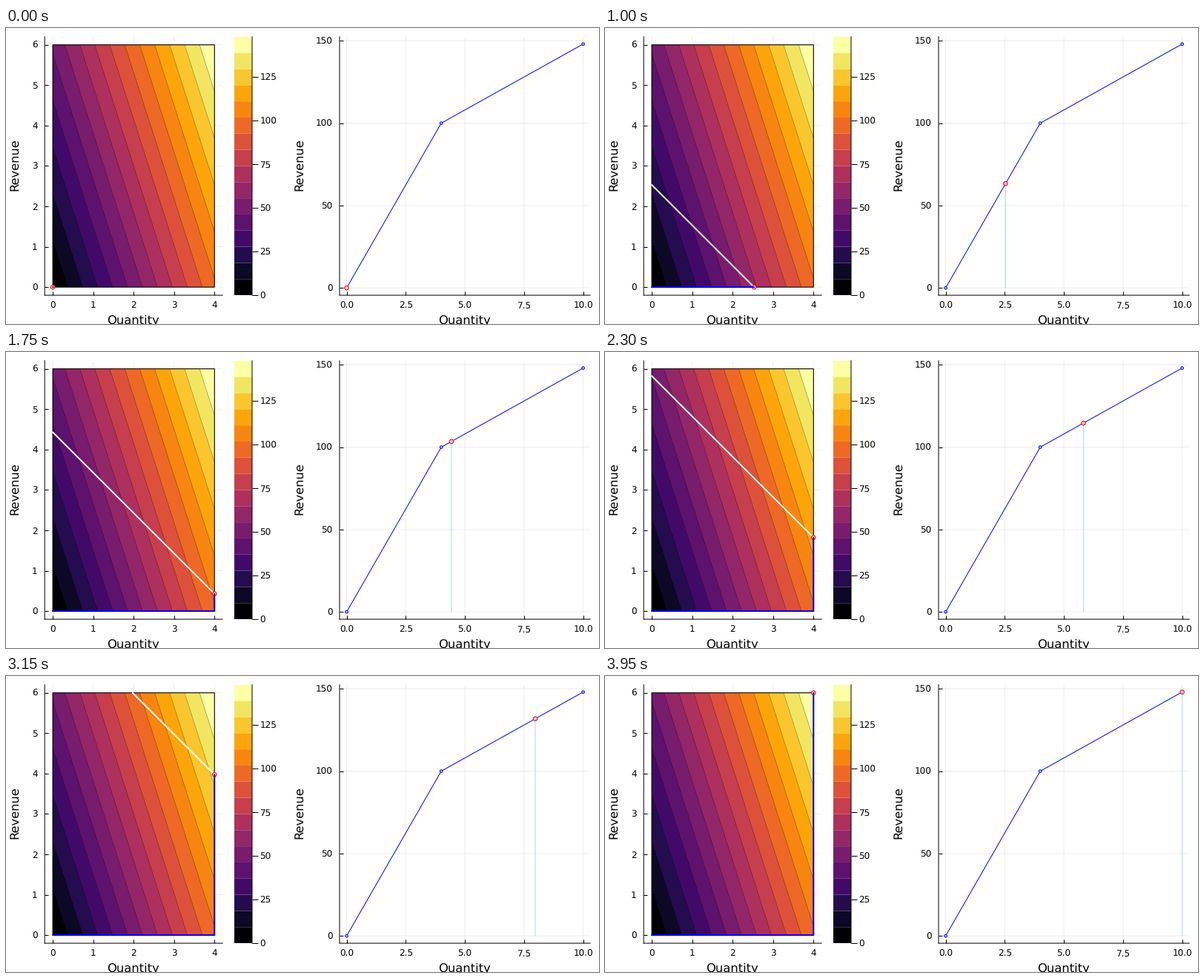
Animation of 800 by 400 pixels, one loop 4 s. Source, as a matplotlib script:

```python
import numpy as np
import matplotlib as mpl
import matplotlib.pyplot as plt
from matplotlib.animation import FuncAnimation
from matplotlib.patches import Ellipse, Rectangle

W, H, DPI = 800, 400, 100
FRAMES, INTERVAL = 80, 50
TOP, BOTTOM = 11.8, 361.1
X_MAX, Y_MAX = 4, 6
PRICE_X, PRICE_Y = 25, 8
Z_MAX = PRICE_X * X_MAX + PRICE_Y * Y_MAX
BANDS = 16


def px(n):
    return n * 72 / DPI


mpl.rcParams.update({
    "font.family": "DejaVu Sans",
    "font.size": px(12),
    "axes.linewidth": px(1),
    "text.hinting": "none",
})
fig = plt.figure(figsize=(W / DPI, H / DPI), dpi=DPI, facecolor="white")


def panel(left, right, xlim, ylim, spines):
    box = [left / W, 1 - BOTTOM / H, (right - left) / W, (BOTTOM - TOP) / H]
    ax = fig.add_axes(box, xlim=xlim, ylim=ylim, facecolor="none")
    for side, spine in ax.spines.items():
        spine.set_visible(side in spines)
        spine.set_snap(False)
    return ax


def style_plot(ax, xticks, yticks, x_mid, y_base):
    ax.set_xticks(xticks)
    ax.set_yticks(yticks)
    ax.tick_params(direction="in", length=px(5), width=px(1))
    ax.tick_params(axis="x", pad=px(8.2))
    ax.tick_params(axis="y", pad=px(9.4))
    ax.grid(color="black", alpha=0.07, lw=px(1), snap=False)
    ax.set_axisbelow(True)
    fig.text(x_mid / W, 0, "Quantity", size=px(16.4), ha="center",
             va="baseline")
    fig.text(y_base / W, 1 - 184.7 / H, "Revenue", size=px(16.3), rotation=90,
             rotation_mode="anchor", ha="center", va="baseline")


def line(ax, x, y, color, width, z):
    return ax.plot(x, y, color=color, lw=px(width), zorder=z, snap=False,
                   solid_capstyle="round", clip_on=False)[0]


def dot(ax, x, y, radius, edge, fill, z):
    # Patches keep subpixel positions, which line markers round off
    unit = np.diff(ax.transData.transform([(0, 0), (1, 1)]), axis=0)[0]
    return ax.add_patch(Ellipse((x, y), *(2 * radius / unit), ec=edge, fc=fill,
                                lw=px(1), zorder=z, clip_on=False))


# Feasible region with revenue contours
left = panel(52.2, 292.2, (-0.2, 4.2), (-0.2, 6.2), ("left", "bottom"))
style_plot(left, range(5), range(7), 171.5, 16.6)
levels = np.linspace(0, Z_MAX, BANDS + 1)
colors = mpl.colormaps["inferno"](np.linspace(0, 1, BANDS))
region = left.add_patch(Rectangle((0, 0), X_MAX, Y_MAX, fc=colors[0], lw=0))
gx, gy = np.meshgrid([-1, X_MAX + 1], [-1, Y_MAX + 1])
revenue = PRICE_X * gx + PRICE_Y * gy
for low, color in zip(levels[1:], colors[1:]):
    band = left.contourf(gx, gy, revenue, [low, 2 * Z_MAX], colors=[color],
                         antialiased=True, zorder=2)
    band.set_clip_path(region)
edges = left.contour(gx, gy, revenue, levels[1:-1], colors="black", alpha=0.5,
                     linewidths=px(0.5), zorder=2.1)
edges.set_clip_path(region)
left.set(xlim=(-0.2, 4.2), ylim=(-0.2, 6.2))
line(left, [0, X_MAX, X_MAX, 0, 0], [0, 0, Y_MAX, Y_MAX, 0], "black", 1.1, 2.2)

# Colour scale
bar = panel(308, 332, (0, 1), (0, Z_MAX), ("right",))
for low, color in zip(levels, colors):
    bar.add_patch(Rectangle((0, low), 1, levels[1], fc=color, lw=0,
                            snap=False))
bar.set_xticks([])
bar.yaxis.tick_right()
bar.set_yticks(range(0, 126, 25))
bar.tick_params(axis="y", length=px(8), width=px(1), pad=px(2.5))

# Best revenue for a given quantity
corner = PRICE_X * X_MAX
right = panel(450, 788.2, (-0.3, 10.3), (-0.03 * Z_MAX, 1.03 * Z_MAX),
              ("left", "bottom"))
style_plot(right, np.arange(0, 10.1, 2.5), range(0, 151, 50), 618.5, 400.6)
knots = [0, X_MAX, X_MAX + Y_MAX], [0, corner, Z_MAX]
line(right, *knots, "blue", 1, 3)
for x, y in zip(*knots):
    dot(right, x, y, 1.8, "blue", "lightblue", 4)

budget = line(left, [], [], "white", 2, 3)
optimum = dot(left, 0, 0, 2.8, "red", "pink", 4)
path = line(left, [], [], "blue", 2, 5)
drop = line(right, [], [], "lightblue", 1, 2.5)
value = dot(right, 0, 0, 2.8, "red", "pink", 5)


def update(i):
    q = (X_MAX + Y_MAX) * i / (FRAMES - 1)
    x = min(q, X_MAX)
    y = q - x
    best = PRICE_X * x + PRICE_Y * y
    y_top = min(q, Y_MAX)
    budget.set_data([q - y_top, x], [y_top, y])
    budget.set_visible(0 < q < X_MAX + Y_MAX)
    optimum.set_center((x, y))
    # A tiny minimum length keeps the round cap visible at the start
    path.set_data([0, max(x, 0.01), max(x, 0.01)], [0, 0, y])
    drop.set_data([q, q], [0, best])
    value.set_center((q, best))
    return budget, optimum, path, drop, value


anim = FuncAnimation(fig, update, frames=FRAMES, interval=INTERVAL,
                     repeat=True, repeat_delay=0)
plt.show()
```
